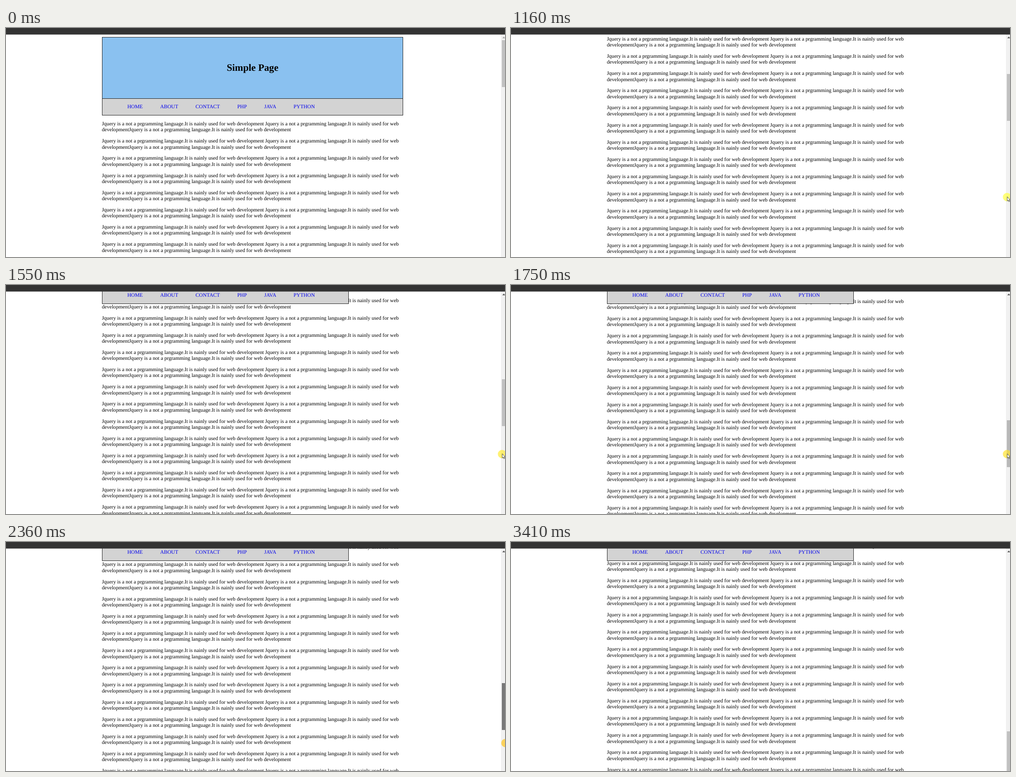
These frames come from a looping animation (1102x508 px, 4270 ms). An HTML page:

```html
<!DOCTYPE html>
<html lang="en">
<head>
<meta charset="utf-8">
<title>Simple Page</title>
<style>
html, body { margin: 0; width: 100%; height: 100%; overflow: hidden; background: #fff; }
body {
  position: relative;
  font: 11.58px/13.36px "Liberation Serif", "Times New Roman", serif;
  text-rendering: geometricPrecision;
  white-space: nowrap;
  color: #000;
}
div, nav, svg { position: absolute; box-sizing: border-box; }
#page { left: 0; width: 1102px; }
#head {
  left: 212px; top: 20px; width: 665px; height: 137px;
  border: 1px solid #222; background: #8ac1f0;
  font-size: 21.75px; font-weight: bold; line-height: 135px; text-align: center;
}
nav {
  left: 212px; height: 37px; padding-left: 55px;
  border: solid #222; border-width: 0 1px 1px; background: #d3d3d3;
  color: #00e; line-height: 36px; display: flex; gap: 38.3px;
}
#text { left: 211.8px; top: 206.1px; }
p { margin: 0; height: 38.16px; }
#bar { left: 0; top: 0; width: 1102px; height: 14px; background: #333; box-shadow: 0 1px #3338; }
#track { left: 1093px; top: 14px; width: 9px; height: 494px; background: #f1f1f1; }
#thumb { left: 1095px; width: 7px; height: 104px; }
#over { left: 0; top: 0; }
</style>
</head>
<body>
<div id="page">
  <div id="head">Simple Page</div>
  <div id="text"></div>
</div>
<nav id="menu"><span>HOME</span><span>ABOUT</span><span>CONTACT</span><span>PHP</span><span>JAVA</span><span>PYTHON</span></nav>
<div id="track"></div>
<div id="thumb"></div>
<div id="bar"></div>
<svg id="over" width="1102" height="508">
  <path id="up" d="M1096 22.8h6.6l-3.3-3.6z"/>
  <circle id="glow" r="9.3"/>
  <path id="arrow" d="M.4 .4v9.6l2.2-2 1.5 3.4 1.5-.7-1.5-3.2h3z" fill="#fff" stroke="#222" stroke-width=".8"/>
</svg>
<script>
const LOOP = 4270, FPS = 15;
const PAGE = 91.1, DRAG = 119.7;          // thumb travel in px
const RATIO = 5.01;                       // page px per thumb px
const NAV_SHIFT = 28;                     // text moves up when the menu leaves the flow
const $ = id => document.getElementById(id);
const line = "Jquery is a not a prgramming language.It is nainly used for web";
$("text").innerHTML =
  `<p>${line} development ${line}<br>development${line} development</p>`.repeat(64);

const ramp = (n, start, span) => Math.min(1, Math.max(0, (n - start) / span));
const slide = (n, start, span) => 1 - (1 - ramp(n, start, span)) ** 2;

// n counts ticks of the recording clock
function draw(n) {
  const pages = slide(n, 15.8, 2.04) + slide(n, 20.5, 2.5) + slide(n, 24, 2);
  const offset = PAGE * pages + DRAG * ramp(n, 34.78, 2.1);
  const fixed = n >= 18;
  const y = offset * RATIO + (fixed ? NAV_SHIFT : 0);
  $("page").style.top = -y + "px";
  $("menu").style.top = (fixed ? 5 : 157 - y) + "px";
  $("menu").style.width = (fixed ? 545 : 665) + "px";

  // hover, press, release, leave
  const grey = 193 - 25 * ramp(n, 25, 3) - 48 * (n >= 33) + 48 * ramp(n, 43, 4) + 25 * (n >= 51);
  $("thumb").style.top = 26.7 + offset + "px";
  $("thumb").style.background = `rgb(${grey},${grey},${grey})`;
  $("up").setAttribute("fill", offset ? "#505050" : "#a3a3a3");

  const passing = n < 3;
  const px = passing ? 1083 + 5 * n : 1103 - 7.5 * ramp(n, 8, 4) + 7.5 * ramp(n, 34, 1);
  const py = passing ? 465 - 38 * n : 374 + 129 * slide(n, 34, 3.04);
  $("arrow").setAttribute("transform", `translate(${px} ${py})`);
  $("arrow").setAttribute("opacity", n > 0 && (passing || n > 8) ? 1 : 0);

  const warm = ramp(n, 17, 18);
  $("glow").setAttribute("transform", `translate(${px} ${py + 1})`);
  $("glow").setAttribute("fill", `rgb(255,${255 - 60 * warm},${60 - 40 * warm})`);
  $("glow").setAttribute("opacity", n < 16 ? 0 : .68 * (1 - ramp(n, 43, 4)));
}

const start = performance.now();
function tick() {
  const t = (performance.now() - start) % LOOP;
  draw(Math.floor(t * FPS / 1000));
  requestAnimationFrame(tick);
}
tick();
</script>
</body>
</html>
```
